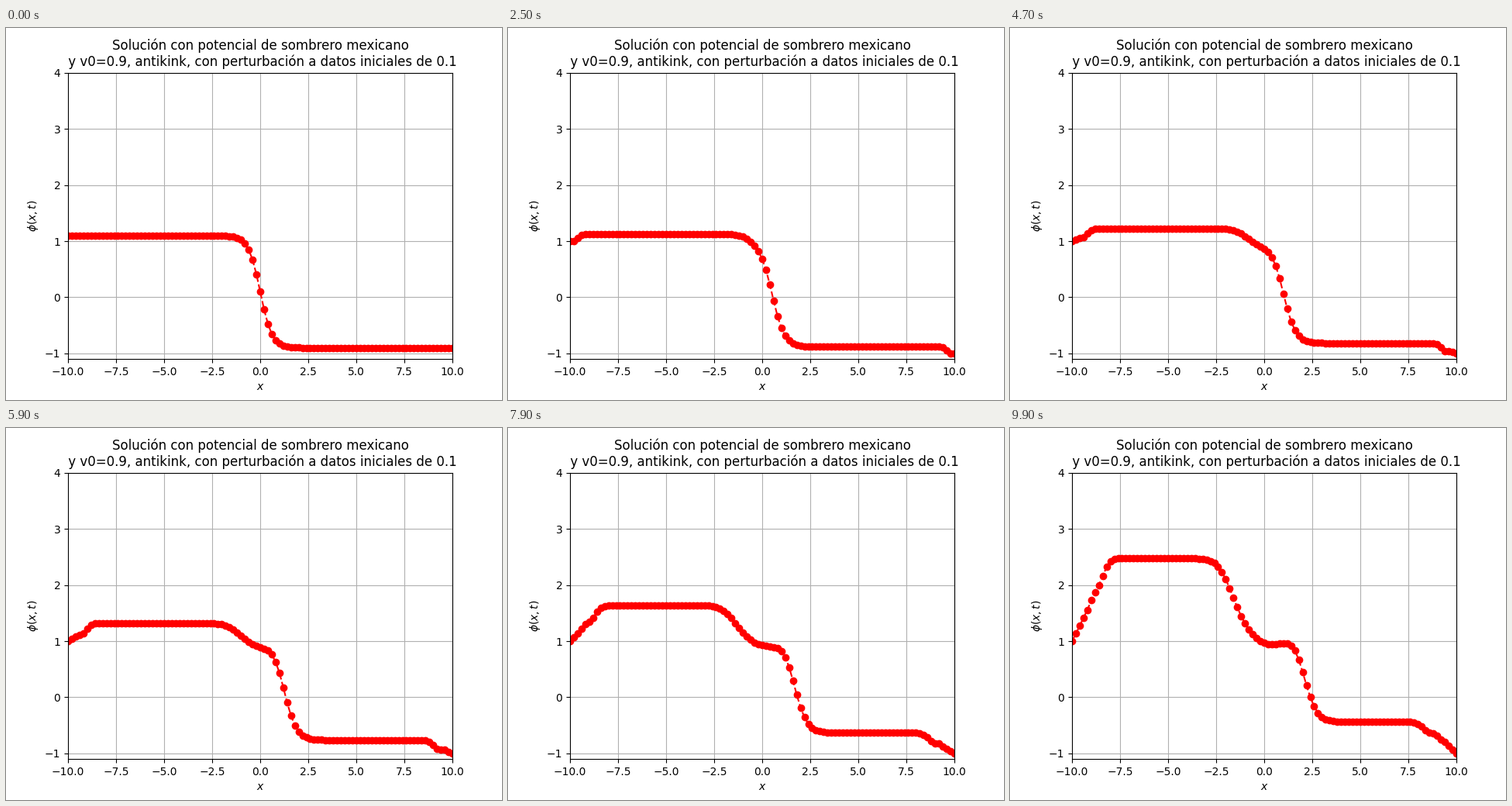
Write a matplotlib script that moves like this. It is 640 px wide and 480 px high and loops after 10000 ms.

```python
import numpy as np
import matplotlib.pyplot as plt
from matplotlib.animation import FuncAnimation

FRAMES = 100
DT = 0.02
V0 = 0.9
SHIFT = 0.1

x = np.linspace(-10, 10, 101)
dx = x[1] - x[0]


def accel(phi):
    """phi_tt = phi_xx + phi^3 - phi on the inner points."""
    a = np.zeros_like(phi)
    mid = phi[1:-1]
    a[1:-1] = (phi[2:] - 2 * mid + phi[:-2]) / dx**2 + mid**3 - mid
    return a


def clamp(phi):
    phi[0], phi[-1] = 1, -1
    return phi


def evolve():
    """Leapfrog from a shifted, boosted antikink with fixed ends."""
    k = 1 / np.sqrt(2 * (1 - V0**2))
    phi = SHIFT - np.tanh(k * x)
    vel = V0 * k / np.cosh(k * x) ** 2
    states = [phi, clamp(phi + DT * vel + 0.5 * DT**2 * accel(phi))]
    while len(states) < FRAMES:
        old, now = states[-2:]
        states.append(clamp(2 * now - old + DT**2 * accel(now)))
    return states


states = evolve()

fig, ax = plt.subplots(figsize=(6.4, 4.8), dpi=100)
line, = ax.plot(x, states[0], "ro--")
ax.set_xlim(-10, 10)
ax.set_ylim(-1.1, 4)
ax.set_xlabel("$x$")
ax.set_ylabel(r"$\phi(x,t)$")
ax.set_title("Solución con potencial de sombrero mexicano\n"
             " y v0=0.9, antikink, con perturbación a datos iniciales de 0.1")
ax.grid(True)


def update(i):
    line.set_ydata(states[i])
    return line,


anim = FuncAnimation(fig, update, frames=FRAMES, interval=100,
                     repeat=True, repeat_delay=0)
plt.show()
```
